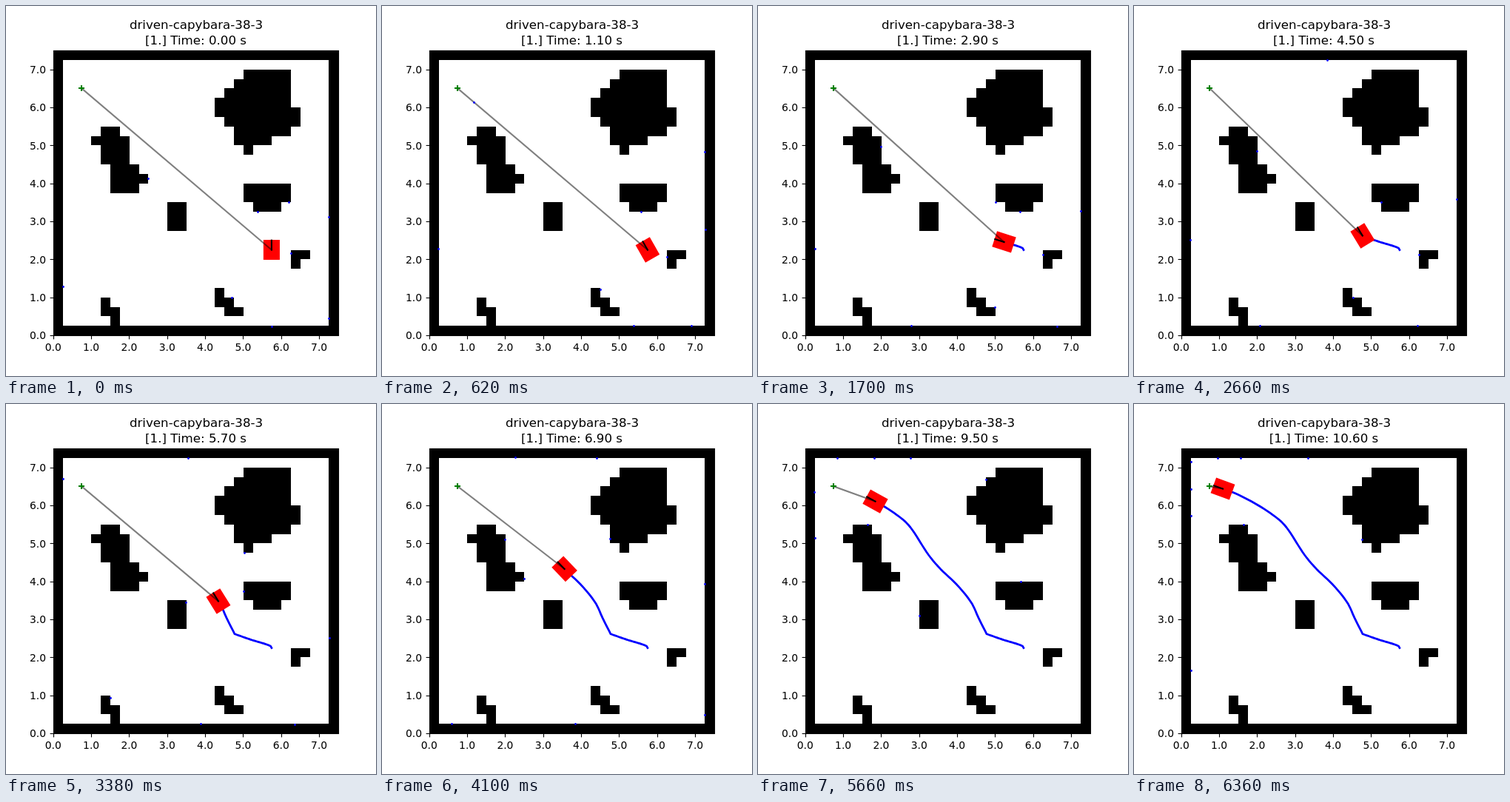
An HTML page with a canvas that plays this animation: 500 px wide and 500 px high, repeating every 6460 ms.

```html
<!DOCTYPE html>
<html lang="en">
<head>
<meta charset="utf-8">
<title>Robot navigation</title>
<style>
  html, body { margin: 0; width: 100%; height: 100%; overflow: hidden; background: #fff; }
  canvas { display: block; }
</style>
</head>
<body>
<canvas id="stage" width="500" height="500"></canvas>
<script>
const ctx = document.getElementById('stage').getContext('2d');

const LOOP = 6460, LAST = 106;
const LEFT = 63.75, TOP = 60, BOTTOM = 445, SIZE = 385;
const MAP_LEFT = 64, CELLS = 30, CELL = SIZE / CELLS, UNIT = 4 * CELL;
const RANGE = 6 * UNIT, BEAMS = 9;
const TURN_START = 2, TURN_RATE = 3.3 * Math.PI / 180;
const GOAL = { x: LEFT + 0.75 * UNIT, y: BOTTOM - 6.5 * UNIT };
const BLUE = '#00f';

// Obstacles in grid cells: left, bottom, right, top
const blocks = [
  [0, 0, CELLS, 1], [0, CELLS - 1, CELLS, CELLS], [0, 0, 1, CELLS], [CELLS - 1, 0, CELLS, CELLS],
  [20, 21, 25, 28], [19, 21, 25, 27], [18, 22, 25, 26], [17, 23, 25, 25],
  [18, 22, 26, 24], [19, 20, 23, 22], [20, 19, 21, 22],
  [5, 18, 7, 22], [4, 20, 8, 21], [5, 18, 8, 20], [6, 15, 9, 18], [9, 16, 10, 17],
  [12, 11, 14, 14], [20, 14, 25, 16], [21, 13, 24, 16], [25, 8, 27, 9], [25, 7, 26, 9],
  [5, 2, 6, 4], [6, 1, 7, 3], [17, 3, 18, 5], [18, 2, 19, 4], [19, 2, 20, 3]
];

// Two legs with a turn on the spot between them
const approach = makeLeg(
  [[358.9, 329.5], [357.4, 327.2], [350, 324.2], [332.3, 318.9], [309, 310.8]], 11, 44, 8, 6);
const crossing = makeLeg(
  [[309, 310.8], [298, 289], [288.5, 268.8], [269.5, 245], [246, 222.3], [230.3, 203.7],
   [208.3, 169.8], [196.5, 156.7], [170, 138.2], [138.5, 121.4], [120, 114.6]], 44, LAST, 6, 5);
const TURN_BACK = 34;

function makeLeg(points, start, end, speedUp, slowDown) {
  const samples = [{ x: points[0][0], y: points[0][1], d: 0 }], parts = 24;
  for (let i = 0; i < points.length - 1; i++) {
    const [a, b] = [points[i], points[i + 1]];
    const before = points[i - 1] || a, after = points[i + 2] || b;
    const dist = (p, q) => Math.hypot(q[0] - p[0], q[1] - p[1]);
    const span = dist(a, b);
    const scaleA = span / (dist(before, a) + span), scaleB = span / (span + dist(b, after));
    for (let k = 1; k <= parts; k++) {
      const u = k / parts, v = 1 - u;
      const [x, y] = [0, 1].map(c =>
        v * v * (1 + 2 * u) * a[c] + u * u * (3 - 2 * u) * b[c] +
        u * v * (v * scaleA * (b[c] - before[c]) - u * scaleB * (after[c] - a[c])));
      const last = samples[samples.length - 1];
      samples.push({ x, y, d: last.d + Math.hypot(x - last.x, y - last.y) });
    }
  }
  return { samples, start, end, speedUp, slowDown };
}

// Distance driven with a linear ramp at both ends
function travelled({ samples, start, end, speedUp, slowDown }, step) {
  const total = samples[samples.length - 1].d;
  const speed = total / (end - start - (speedUp + slowDown) / 2);
  const t = Math.min(Math.max(step, start), end) - start, left = end - start - t;
  if (t < speedUp) return speed * t * t / (2 * speedUp);
  if (left < slowDown) return total - speed * left * left / (2 * slowDown);
  return speed * (t - speedUp / 2);
}

function along(leg, step) {
  const d = travelled(leg, step), s = leg.samples;
  const i = Math.max(1, s.findIndex(p => p.d >= d - 1e-6));
  const a = s[i - 1], b = s[i], u = (d - a.d) / (b.d - a.d);
  return {
    x: a.x + u * (b.x - a.x),
    y: a.y + u * (b.y - a.y),
    angle: Math.atan2(a.y - b.y, b.x - a.x)
  };
}

const poses = [];
let heading = Math.PI / 2;
for (let step = 0; step <= LAST; step++) {
  const { x, y } = along(step < crossing.start ? approach : crossing, step);
  const aim = along(step < TURN_BACK ? approach : crossing, Math.max(step, 16)).angle;
  if (step > TURN_START) {
    heading += Math.max(-TURN_RATE, Math.min(TURN_RATE, aim - heading));
  }
  poses.push({ x, y, angle: heading });
}

function isSolid(x, y) {
  const col = (x - MAP_LEFT) / CELL, row = (BOTTOM - y) / CELL;
  return blocks.some(([l, b, r, t]) => col >= l && col < r && row >= b && row < t);
}

function castRay({ x, y }, angle) {
  const dx = Math.cos(angle), dy = -Math.sin(angle);
  let d = 0;
  while (d < RANGE && !isSolid(x + d * dx, y + d * dy)) d += 0.5;
  return [x + d * dx, y + d * dy];
}

const scans = poses.map(pose => Array.from({ length: BEAMS }, (_, k) =>
  castRay(pose, pose.angle + Math.PI + k * 2 * Math.PI / BEAMS)));

function line(points, color, width, cap = 'square') {
  ctx.beginPath();
  points.forEach(([x, y]) => ctx.lineTo(x, y));
  ctx.strokeStyle = color;
  ctx.lineWidth = width;
  ctx.lineCap = cap;
  ctx.lineJoin = 'round';
  ctx.stroke();
}

function text(str, x, y, size, align) {
  ctx.font = `${size}px "DejaVu Sans", sans-serif`;
  ctx.textAlign = align;
  ctx.fillStyle = '#000';
  ctx.fillText(str, x, y);
}

function drawMap() {
  const px = col => Math.round(MAP_LEFT + col * CELL);
  const py = row => Math.round(BOTTOM - row * CELL);
  ctx.fillStyle = '#000';
  for (const [l, b, r, t] of blocks) {
    ctx.fillRect(px(l), py(t), px(r) - px(l), py(b) - py(t));
  }
}

function drawAxes() {
  ctx.strokeStyle = '#000';
  ctx.lineWidth = 1.11;
  ctx.lineJoin = 'miter';
  ctx.strokeRect(64.5, TOP + 0.5, SIZE, SIZE);
  for (let n = 0; n < 8; n++) {
    const x = LEFT + n * UNIT, y = BOTTOM - n * UNIT;
    const tickX = Math.round(x) + 0.5, tickY = Math.round(y) + 0.5;
    line([[tickX, 445.5], [tickX, 450.4]], '#000', 1.11, 'butt');
    line([[64.5, tickY], [59.6, tickY]], '#000', 1.11, 'butt');
    text(n.toFixed(1), x, 466, 13.89, 'center');
    text(n.toFixed(1), 54, Math.round(y + 5.2), 13.89, 'right');
  }
}

function drawRobot({ x, y, angle }) {
  const length = 0.525 * UNIT, width = 0.43 * UNIT;
  ctx.save();
  ctx.translate(x, y);
  ctx.rotate(-angle);
  ctx.fillStyle = '#f00';
  ctx.fillRect(-length / 2, -width / 2, length, width);
  ctx.restore();
}

function drawGoal() {
  const x = Math.round(GOAL.x), y = Math.round(GOAL.y), arm = 4;
  line([[x - arm, y], [x + arm, y]], '#008000', 2.08, 'butt');
  line([[x, y - arm], [x, y + arm]], '#008000', 2.08, 'butt');
}

function drawScan(hits) {
  ctx.fillStyle = BLUE;
  for (const [x, y] of hits) {
    ctx.beginPath();
    ctx.arc(Math.round(x) + 0.5, Math.round(y) + 0.5, 1.4, 0, 2 * Math.PI);
    ctx.fill();
  }
}

function draw(step) {
  const pose = poses[step], { x, y, angle } = pose;
  ctx.fillStyle = '#fff';
  ctx.fillRect(0, 0, 500, 500);
  drawMap();

  if (step > 0) line(poses.slice(0, step + 1).map(p => [p.x, p.y]), BLUE, 2.78);
  drawRobot(pose);
  line([[GOAL.x, GOAL.y], [x, y]], 'rgba(0,0,0,0.5)', 2.08);
  const nose = 0.25 * UNIT;
  line([[x, y], [x + nose * Math.cos(angle), y - nose * Math.sin(angle)]], '#000', 2.08);
  drawScan(scans[step]);
  drawGoal();

  drawAxes();
  text('driven-capybara-38-3', 257, 31, 16.67, 'center');
  text(`[1.] Time: ${(step / 10).toFixed(2)} s`, 256.5, 52, 16.67, 'center');
}

// Steps alternate between 20 ms and 100 ms
function stepAt(ms) {
  const pair = Math.floor(ms / 120);
  return Math.min(LAST, 2 * pair + (ms - pair * 120 >= 20 ? 1 : 0));
}

function tick() {
  draw(stepAt(performance.now() % LOOP));
  requestAnimationFrame(tick);
}
tick();
</script>
</body>
</html>
```
